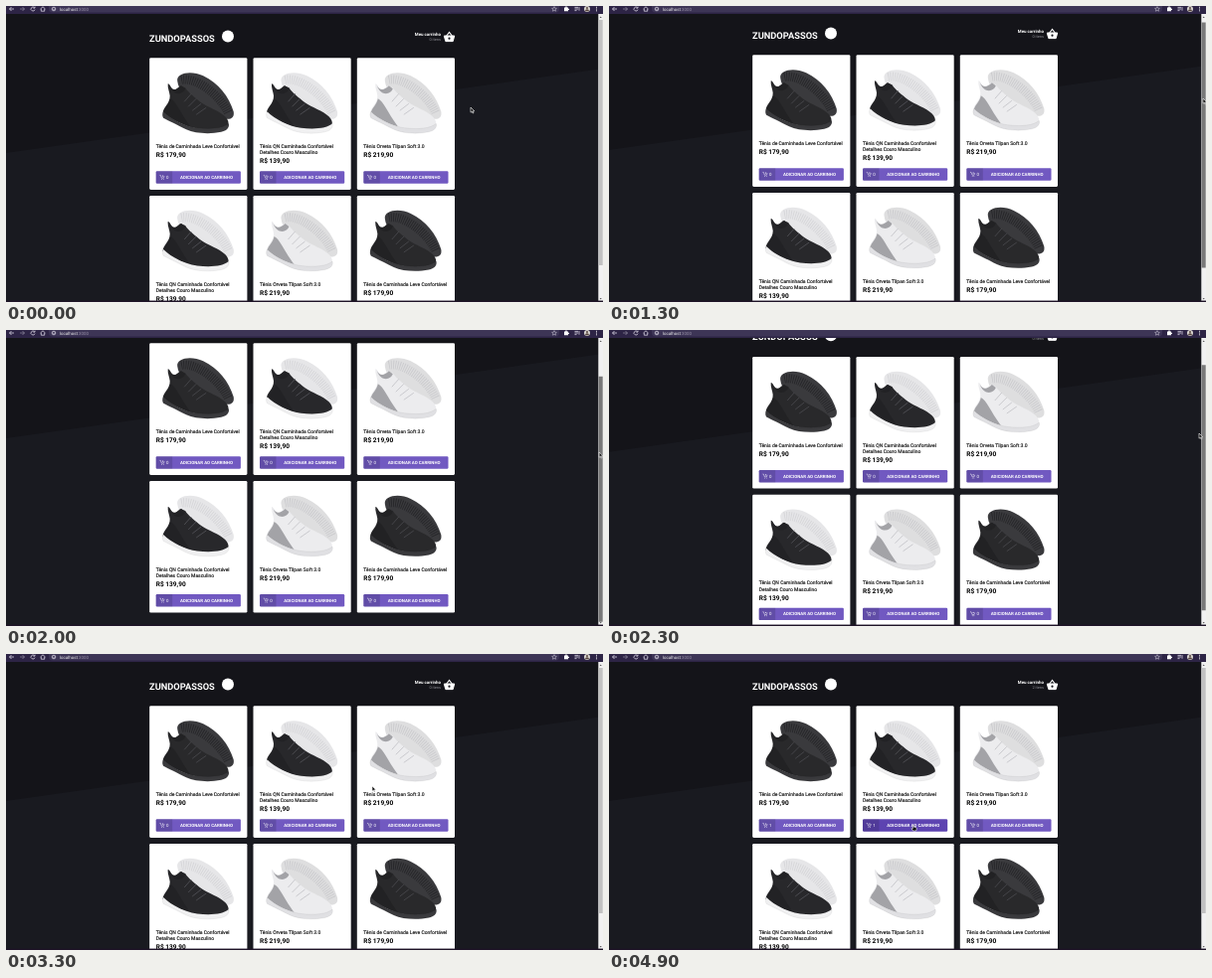
Recreate the animation shown at these times as an HTML page. Size 600 px wide and 298 px high, loop 5 s.

```html
<!DOCTYPE html>
<html lang="pt-BR">
<head>
<meta charset="utf-8">
<style>
  html, body { margin: 0; width: 100%; height: 100%; overflow: hidden; background: #191a21; }
  svg { display: block; width: 600px; height: 298px; }
  text { font: 5px Roboto, sans-serif; text-rendering: geometricPrecision; white-space: pre; }
  .brand { font-size: 9.3px; font-weight: 700; fill: #fff; }
  .price { font-size: 6.56px; font-weight: 700; fill: #000; }
  .name { fill: #111; stroke: #111; stroke-width: .14; }
  .label { font-size: 4.375px; font-weight: 700; fill: #fff; text-anchor: middle; }
  .count { font-size: 4.4px; fill: #fff; }
  .cart { font-size: 4.4px; font-weight: 700; fill: #fff; text-anchor: end; }
  .items { font-size: 3.9px; fill: #8d8d93; text-anchor: end; }
  .url { font-size: 4.4px; fill: #eee; }
  .line { fill: none; stroke: #d8d4e2; stroke-width: .8; }
</style>
</head>
<body>
<svg viewBox="0 0 600 298">
  <defs>
    <g id="trolley">
      <path d="M0 .4H1L2 3.2H4L4.7 1.1M2.6 1.1H3.8M3.2 .5V1.7" fill="none" stroke="#fff" stroke-width=".5"/>
      <circle cx="2.2" cy="4.4" r=".45" fill="#fff"/><circle cx="3.9" cy="4.4" r=".45" fill="#fff"/>
    </g>
  </defs>
  <g id="page">
    <rect width="600" height="400" fill="#191a20"/>
    <path d="M0 0H600V63L0 148Z" fill="#141419"/>
    <text class="brand" x="144" y="35.5">ZUNDOPASSOS</text>
    <circle cx="223" cy="30.5" r="6" fill="#fff"/>
    <text class="cart" x="437" y="30">Meu carrinho</text>
    <text class="items" id="items" x="437" y="35.3"></text>
    <path d="M440.3 30H450.7L449.2 35.6H441.8Z" fill="#fff" stroke="#fff" stroke-linejoin="round"/>
    <path d="M442.7 30L445.5 26.4L448.3 30" fill="none" stroke="#fff" stroke-width="1.1"/>
    <circle cx="445.5" cy="32.7" r="1.1" fill="#141419"/>
    <g id="cards"></g>
  </g>

  <rect x="595.3" y="8" width="4.7" height="290" fill="#f1f1f1"/>
  <path d="M596.7 12L597.7 10.5L598.7 12ZM596.7 294L597.7 295.5L598.7 294Z" fill="#555"/>
  <rect id="thumb" x="595.6" width="4.1" height="247"/>
  <rect y="296.6" width="600" height="1.4" fill="#1d1226"/>

  <rect width="600" height="8" fill="#2d2445"/>
  <rect x="43" y="-3" width="513" height="9.6" rx="4" fill="#3d3556"/>
  <g class="line">
    <path d="M8 3H3.5M5.5 1L3.5 3L5.5 5"/>
    <path d="M14 3H18.5M16.5 1L18.5 3L16.5 5" opacity=".5"/>
    <path d="M28.6 1.7A2 2 0 1 0 29 3.6M29 .6V2.1H27.4"/>
    <path d="M34.5 3L37 .8L39.5 3M35.3 2.8V5.2H38.7V2.8"/>
    <circle cx="48" cy="3" r="1.8"/><path d="M48 2.7V4"/>
    <path d="M551 .6L551.7 2.2L553.4 2.4L552.1 3.5L552.5 5.2L551 4.3L549.5 5.2L549.9 3.5L548.6 2.4L550.3 2.2Z" stroke-width=".5"/>
    <path d="M571.5 1.4H575M571.5 3H575M571.5 4.6H573.5M576 1V4.7"/>
  </g>
  <path d="M561 1.6H565V5.2H561ZM562.3 .6H563.7V2H562.3ZM565 2.7H566V4H565Z" fill="#fff"/>
  <circle cx="584" cy="3" r="3" fill="#d9d5d0"/>
  <path d="M582 5.2A2 2 0 0 1 586 5.2ZM583 2A1 1 0 1 1 585 2A1 1 0 1 1 583 2" fill="#54433d"/>
  <path d="M593.5 .8V5.4" stroke="#fff" stroke-dasharray=".9 .9"/>
  <text class="url" x="54" y="4.6">localhost<tspan fill="#958da5">:3000</tspan></text>

  <g id="cursor" stroke="#fff" stroke-width=".6" fill="#111" stroke-linejoin="round">
    <path id="arrow" d="M0 0V5.2L1.3 4.1L2.1 6L3 5.6L2.2 3.8H3.8Z"/>
    <path id="hand" d="M-.6 .4Q0 -.4 .6 .4V2.2L2.8 2.8Q3.4 3.2 3.1 4.6L2.6 6H-.4L-2 3.8Q-1.8 3 -.6 3.6Z"/>
  </g>
</svg>
<script>
const $ = id => document.getElementById(id);

const styles = {
  black: { upper: '#29292b', sole: '#39393c', back: '#3a3a3d', rib: '#262629', heel: '#222224', lace: '#48484c' },
  mixed: { upper: '#28282b', sole: '#f0f0f1', back: '#e6e6e8', rib: '#d6d6d9', heel: '#222225', lace: '#505055' },
  white: { upper: '#ececee', sole: '#e0e0e3', back: '#dededf', rib: '#cbcbce', heel: '#a3a3a7', lace: '#c6c6ca' }
};
const walk = { lines: ['Tênis de Caminhada Leve Confortável'], price: '179,90', style: 'black' };
const leather = { lines: ['Tênis QN Caminhada Confortável', 'Detalhes Couro Masculino'], price: '139,90', style: 'mixed' };
const light = { lines: ['Tênis Orveta Tilpan Soft 3.0'], price: '219,90', style: 'white' };
const products = [walk, leather, light, leather, light, walk];

// One pair of shoes, in card coordinates: standing sole, upper, heel, collar, laces, sole
const shoes = s => `
  <path d="M28 23C27 15 42 12 54 18C69 25 80 39 84.5 54C86 62 79 63 72 60L36 38C31 33 28.5 28 28 23Z" fill="${s.back}"/>
  <path d="M32 22C46 19 70 36 79 55" fill="none" stroke="${s.rib}" stroke-width="9" stroke-dasharray=".9 1.3"/>
  <path d="M18.5 26C21 26 22 32 25 33L31 28L36 30C39 35 46 40 52 45C59 50 70 53 76 59C79 62 80 65 79 68C70 73 54 73 42 70C32 67 20 60 13.5 56C13 50 21 46 20.5 38C20 34 18 30 18.5 26Z" fill="${s.upper}"/>
  <path d="M21 41C27 44 30 54 41 69C30 66 20 60 14 55C15 50 20 47 21 41Z" fill="${s.heel}"/>
  <path d="M20 28C23 33 27 33 32 28L36 31C34 37 24 39 20 28Z" fill="${s.heel}"/>
  <path d="M35 44L42 36M39 49L47 41M43 53L52 46M47 57L57 50" fill="none" stroke="${s.lace}" stroke-width=".9"/>
  <path d="M14 54C22 62 36 69 48 70.5C62 72 74 71 79.5 66C80.5 69 79 73 72 74.5C60 77 46 76 37 72C27 67 19 63 14 60.5C12.5 58 13 56 14 54Z"
    fill="${s.sole}" stroke="#0002" stroke-width=".4"/>`;

$('cards').innerHTML = products.map((p, i) => `
  <g transform="translate(${144.2 + i % 3 * 104.3} ${52.3 + (i > 2) * 138.7})">
    <rect width="98.2" height="132.6" rx="1.3" fill="#fff"/>
    ${shoes(styles[p.style])}
    ${p.lines.map((l, n) => `<text class="name" x="6.5" y="${90.7 + n * 6.3}">${l}</text>`).join('')}
    <text class="price" x="6.5" y="${93.4 + p.lines.length * 6.3}">R$ ${p.price}</text>
    <rect class="button" x="6.5" y="114" width="85.2" height="12.4" rx="1.2"/>
    <path d="M7.7 114H23V126.4H7.7Q6.5 126.4 6.5 125.2V115.2Q6.5 114 7.7 114Z" fill="#0002"/>
    <use href="#trolley" x="10.2" y="117.7"/>
    <text class="count" x="16.8" y="121.7">0</text>
    <text class="label" x="57.3" y="121.7">ADICIONAR AO CARRINHO</text>
  </g>`).join('');
const buttons = document.querySelectorAll('.button');
const counts = document.querySelectorAll('.count');

// Keys are [time, ...values], joined by straight lines
function track(keys, t) {
  const n = keys.findIndex(k => k[0] > t);
  if (n < 0) return keys.at(-1).slice(1);
  if (n === 0) return keys[0].slice(1);
  const [a, b] = [keys[n - 1], keys[n]], f = (t - a[0]) / (b[0] - a[0]);
  return a.slice(1).map((v, i) => v + (b[i + 1] - v) * f);
}
const path = [
  [0, 467, 102], [600, 578, 90], [1000, 597, 91], [1200, 597, 91], [1300, 597, 93],
  [1500, 597, 123], [2100, 596, 123], [2300, 593, 104], [2500, 592, 79], [2900, 592, 79],
  [3500, 256, 160], [3800, 221, 172], [4200, 221, 172], [4700, 306, 172]
];
const scrolling = [[1200, 0], [1300, 3], [1500, 39], [2100, 39], [2300, 25.3], [2500, 0]];
const clicks = [4000, 4800];

function over(i, t) {
  const [x, y] = track(path, t), left = 150.7 + i * 104.3;
  return x > left && x < left + 85.2 && y > 166.3 && y < 178.7;
}
// Share of the last 200 ms spent over the button
function hover(i, t) {
  let sum = 0;
  for (let k = 0; k < 10; k++) sum += over(i, t - k * 20);
  return sum / 10;
}

function draw(now) {
  const t = Math.floor(now % 5000 / 100) * 100;
  const [x, y] = track(path, t), [scroll] = track(scrolling, t);
  const total = clicks.filter(c => t >= c).length;

  $('page').setAttribute('transform', `translate(0 ${-scroll})`);
  $('thumb').setAttribute('y', 14 + scroll * .84);
  $('thumb').setAttribute('fill', t >= 1200 && t < 2600 ? '#787878' : x >= 595.3 ? '#a8a8a8' : '#c1c1c1');
  $('items').textContent = total + (total === 1 ? ' item' : ' itens');
  clicks.forEach((click, i) => {
    const h = hover(i, t);
    buttons[i].setAttribute('fill', `rgb(${113 - 20 * h} ${89 - 22 * h} ${193 - 16 * h})`);
    counts[i].textContent = +(t >= click);
  });

  const pointing = over(0, t) || over(1, t);
  $('hand').style.display = pointing ? '' : 'none';
  $('arrow').style.display = pointing ? 'none' : '';
  $('cursor').setAttribute('transform', `translate(${x} ${y})`);
  requestAnimationFrame(draw);
}
buttons.forEach(b => b.setAttribute('fill', '#7159c1'));
requestAnimationFrame(draw);
</script>
</body>
</html>
```
